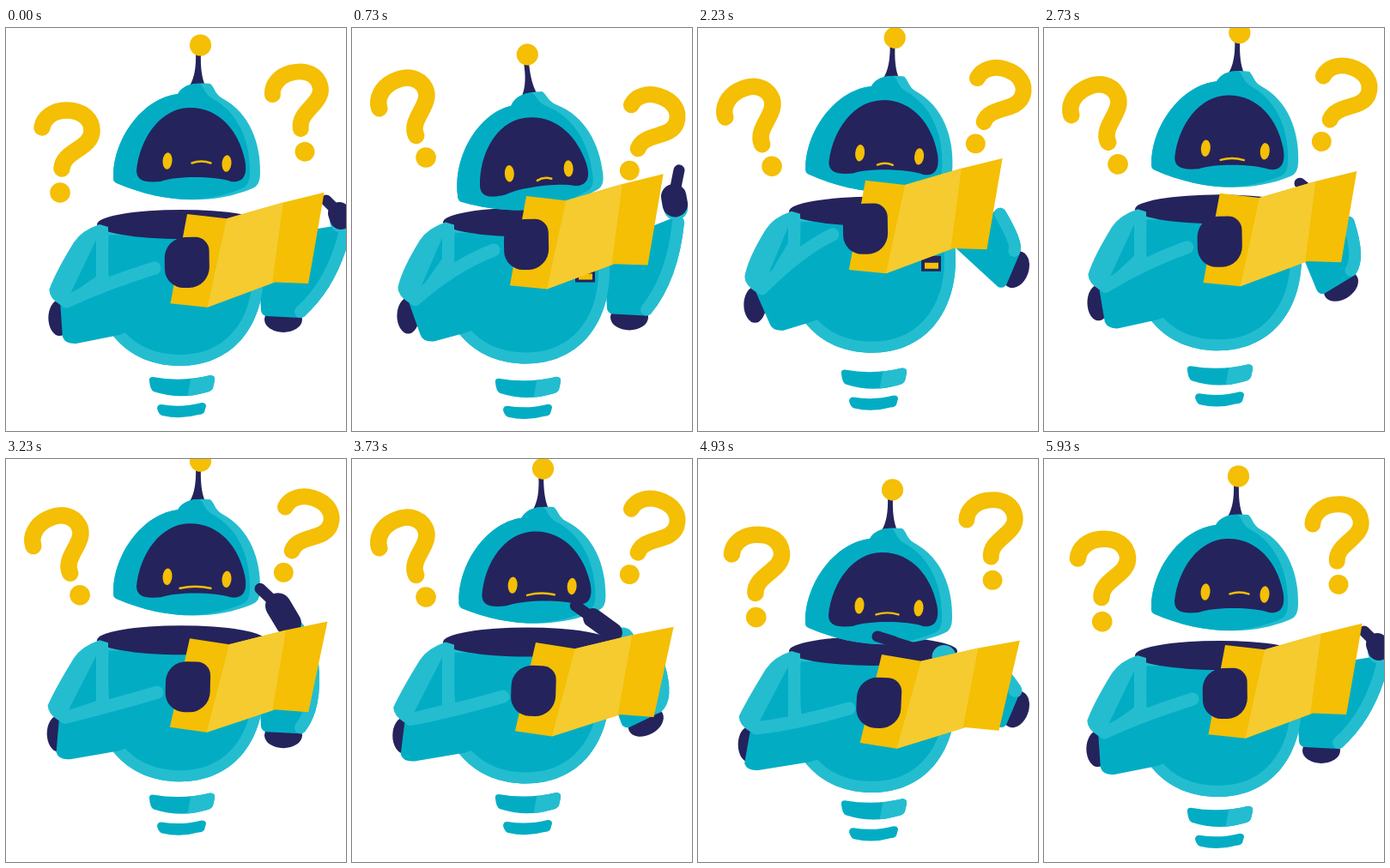
Recreate the animation shown at these times as an HTML page with a canvas. Size 396 by 470 pixels, loop 6.01 s.

```html
<!DOCTYPE html>
<html lang="en">
<head>
<meta charset="utf-8">
<title>Puzzled robot</title>
<style>
  html, body { margin: 0; width: 100%; height: 100%; overflow: hidden; background: #fff; }
  canvas { display: block; }
</style>
</head>
<body>
<canvas id="stage" width="396" height="470"></canvas>
<script>
const ctx = document.getElementById('stage').getContext('2d');
const LOOP = 6010, PERIOD = 6000;
const CYAN = '#02adc4', LIGHT = '#24bdd0', NAVY = '#25235c', GOLD = '#f4bf04', PALE = '#f5cb2f';

// Key poses, relative to the bobbing body. The right elbow hangs down (out: 0) or sticks out (1);
// mouth is x, y, half width; slide moves the question marks apart.
const peek = {
  hold: [0, 100], drop: 0, tilt: 0, slide: 0, paper: [211, 217], out: 0,
  cuff: [395, 236], palm: [388, 216], tip: [373, 201], width: 26, mouth: [5, 1, 11]
};
const read = {
  hold: [900, 1500], drop: 14.5, tilt: -8.3, slide: 1, paper: [202, 196], out: 0,
  cuff: [378, 228], palm: [373, 197], tip: [382, 164], width: 30, mouth: [5, 12, 8]
};
const lower = {
  hold: [1930, 2400], drop: 6.5, tilt: 0.9, slide: 0, paper: [195, 193], out: 1,
  cuff: [352, 232], palm: [310, 235], tip: [300, 230], width: 20, mouth: [-5, 12, 9]
};
const scratch = {
  hold: [3050, 3400], drop: 0, tilt: 0, slide: 0, paper: [214, 227], out: 0,
  cuff: [357, 256], palm: [317, 189], tip: [296, 169], width: 30, mouth: [-2, 12, 18]
};
const think = {
  hold: [4150, 4250], drop: 16.5, tilt: -3.2, slide: 0, paper: [214, 233], out: 1,
  cuff: [358, 258], palm: [228, 218], tip: [209, 212], width: 12, mouth: [-2, 9, 13]
};
const POSES = [
  peek, read, lower, scratch, think,
  { ...think, hold: [4930, 5200], drop: 21, tilt: 0 },
  { ...peek, hold: [5830, LOOP] }
];

const rad = d => d * Math.PI / 180;
const lerp = (a, b, k) => Array.isArray(a) ? a.map((v, i) => lerp(v, b[i], k)) : a + (b - a) * k;
const smooth = k => k * k * (3 - 2 * k);

function poseAt(t) {
  const i = POSES.findLastIndex(p => t >= p.hold[0]);
  const a = POSES[i], b = POSES[i + 1] || a;
  const k = smooth(Math.max(0, (t - a.hold[1]) / (b.hold[0] - a.hold[1])));
  return Object.fromEntries(Object.keys(a).map(key => [key, lerp(a[key], b[key], k)]));
}

// Height of a slow bob that starts at its lowest point after the given delay
const bob = (t, delay) => 9 * (Math.cos(2 * Math.PI * (t - delay) / PERIOD) - 1);

function fill(shape, color) {
  ctx.fillStyle = color;
  ctx.fill(shape);
}

function line(shape, color, width) {
  ctx.strokeStyle = color;
  ctx.lineWidth = width;
  ctx.stroke(shape);
}

function oval(x, y, rx, ry, color, turn = 0) {
  const p = new Path2D();
  p.ellipse(x, y, rx, ry, rad(turn), 0, 2 * Math.PI);
  fill(p, color);
}

function placed(x, y, tilt, draw) {
  ctx.save();
  ctx.translate(x, y);
  ctx.rotate(rad(tilt));
  draw();
  ctx.restore();
}

function inside(shape, draw) {
  ctx.save();
  ctx.clip(shape);
  draw();
  ctx.restore();
}

const HOOK = new Path2D('M-24-34C-22-46-10-54 4-54C24-54 34-43 34-30C34-9 0-7-1 14');
const SPRING_A = new Path2D('M171 407Q205 413 238 405Q244 405 243 411L241 420Q239 424 233 425Q203 434 172 424Q168 422 167 412Q166 407 171 407Z');
const SPRING_B = new Path2D('M181 439Q205 443 228 437Q233 437 233 441L231 448Q229 451 224 451Q203 457 182 452Q178 451 176 444Q176 439 181 439Z');
const SPRING_LIT = new Path2D('M217 400H250V432H211Z');
const BODY = new Path2D('M107 228C104 300 108 340 124 358C145 385 175 394 203 394C262 394 300 350 300 285L298 230Z');
const SKULL = new Path2D('M125 172C126 125 162 81 200 77C206 67 216 63 238 65C243 69 243 77 252 82C284 99 297 135 296 170Q296 184 287 187C240 207 182 204 129 181Q124 179 125 172Z');
const FACE = new Path2D('M152 166C156 128 180 94 213 93C248 92 271 120 278 153C282 172 276 181 262 179C245 173 200 172 180 179C160 181 152 177 152 166Z');
const STALK = new Path2D('M221 28H227Q226 54 232 67H214Q222 54 221 28Z');
const SHEET = new Path2D('M0 0L46 6L112-12L160-23L140 83L101 81L22 109L-21 104Z');
const FOLD = new Path2D('M46 6L112-12L98 82L22 109Z');
const BADGE = new Path2D('M260 281H283V299H260Z');
const BADGE_LIT = new Path2D('M264 289H280V296H264Z');

function mark(x, y, tilt, size) {
  placed(x, y, tilt, () => {
    ctx.scale(size, size);
    line(HOOK, GOLD, 19.5);
    oval(-3, 42, 11.8, 11.8, GOLD);
  });
}

function springs() {
  fill(SPRING_A, CYAN);
  fill(SPRING_B, CYAN);
  inside(SPRING_A, () => fill(SPRING_LIT, LIGHT));
}

function body() {
  fill(BODY, CYAN);
  inside(BODY, () => line(BODY, LIGHT, 26));
  fill(BADGE, NAVY);
  fill(BADGE_LIT, GOLD);
  oval(204, 229, 98, 17, NAVY);
}

function rightSleeve({ out, cuff: [cx, cy] }) {
  const ex = 323 + 47 * out, ey = 340 - 43 * out, turn = -70 * out;
  const c = Math.cos(rad(turn)), s = Math.sin(rad(turn));
  const around = (x, y) => [ex + x * c - y * s, ey + x * s + y * c];
  const near = around(-19, -11), far = around(20, -9);
  const edge = `Q${(far[0] + cx) / 2 + 12} ${(far[1] + cy) / 2 + 13} ${cx} ${cy}`;
  const shape = new Path2D(`M300 262L${near}L${far}${edge}L340 245Z`);
  oval(ex, ey, 22, 15, NAVY, turn);
  fill(shape, CYAN);
  line(shape, CYAN, 14);
  line(new Path2D(`M${far}${edge}`), LIGHT, 14);
}

function leftArm([px, py]) {
  const lift = (225 - py) / 30;
  const x = 49 + 5 * lift, y = 309, low = 68 + 22 * lift;
  const ex = x + 13, ey = y + 14;
  const band = `Q${x + 65} ${py + 81} ${px - 38} ${py + 63}`;
  oval(x + 12, y + 29, 13, 21, NAVY);
  fill(new Path2D(`M119 232L109 229Q88 236 79 250Q58 284 ${x} ${y - 4}Q${x} ${y + 6} ${ex} ${ey}H119Z`), LIGHT);
  fill(new Path2D(`M105 247V${py + 73}L${x + 24} ${y + 2}Z`), CYAN);
  fill(new Path2D(`M${ex} ${ey}${band}L190 ${py + 73}L180 340L132 358L${low + 8} 368Q${low - 5} 369 ${low - 8} 360Z`), CYAN);
  line(new Path2D(`M${ex + 7} ${ey - 4}${band}`), LIGHT, 15);
}

function head({ drop, tilt, mouth: [mx, my, half] }) {
  placed(222.5 + tilt * 0.65, 156.5 + drop, tilt, () => {
    ctx.translate(-222.5, -156.5);
    fill(STALK, NAVY);
    oval(226.5, 20, 12.6, 12.6, GOLD);
    fill(SKULL, LIGHT);
    inside(SKULL, () => {
      ctx.translate(-12, 0);
      fill(SKULL, CYAN);
    });
    fill(FACE, NAVY);
    oval(188, 155, 5.5, 9.7, GOLD, 5);
    oval(257, 158, 5.5, 9.7, GOLD, 5);
    const x = 222.5 + mx, y = 156.5 + my;
    line(new Path2D(`M${x - half} ${y}Q${x} ${y - 4} ${x + half} ${y}`), GOLD, 2.4);
  });
}

function rightHand({ palm, tip, cuff, width }) {
  oval(...lerp(palm, cuff, 0.45), 14, 14, LIGHT);
  line(new Path2D(`M${lerp(palm, cuff, 0.3)}L${palm}`), NAVY, width);
  line(new Path2D(`M${palm}L${tip}`), NAVY, 13);
}

function paper({ paper: [x, y] }) {
  placed(x, y, Math.max(-1, (y - 221) / 5), () => {
    fill(SHEET, GOLD);
    fill(FOLD, PALE);
    const hand = new Path2D();
    hand.roundRect(-27, 27, 52, 59, [24, 16, 24, 22]);
    fill(hand, NAVY);
  });
}

function draw(ms) {
  // Steps alternate between 30 and 70 ms
  const tenth = Math.min(Math.floor(ms / 100), 59);
  const late = ms - tenth * 100 >= 30 ? 1 : 0;
  const t = tenth * 100 + late * 30;
  const swing = 1 - Math.abs((tenth * 2 + late) % 10 - 5) / 5;
  const pose = poseAt(t), y = bob(t, 0);

  ctx.fillStyle = '#fff';
  ctx.fillRect(0, 0, 396, 470);
  ctx.lineCap = ctx.lineJoin = 'round';

  placed(0, bob(t, 600) + 1.8, 0, springs);
  placed(0, y, 0, () => {
    mark(66 + 3 * swing, 150 - 12 * swing - 26 * pose.slide, -28 * swing, 1);
    mark(341 - 3 * swing, 104 + 8 * swing + 21 * pose.slide, -14 + 31 * swing, 0.97);
    rightSleeve(pose);
    body();
    leftArm(pose.paper);
    head(pose);
    rightHand(pose);
    paper(pose);
  });
}

const start = performance.now();
function tick() {
  draw((performance.now() - start) % LOOP);
  requestAnimationFrame(tick);
}
tick();
</script>
</body>
</html>
```
